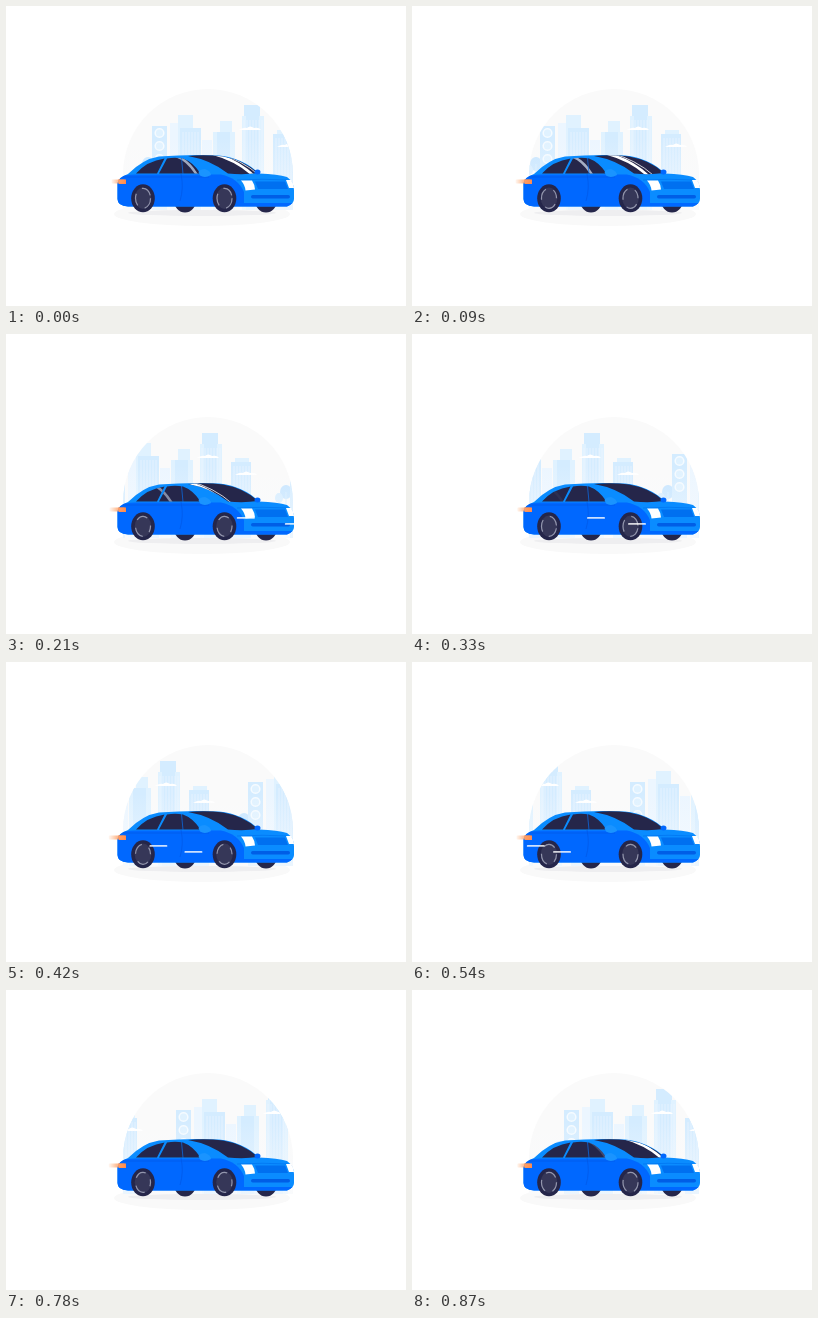
Animation, 400 px wide and 300 px high, one loop 0.9 s. Source, as an HTML page:

```html
<!DOCTYPE html>
<html lang="en">
<head>
<meta charset="utf-8">
<title>City drive</title>
<style>
  html, body { margin: 0; width: 100%; height: 100%; overflow: hidden; background: #fff; }
  svg { display: block; width: 400px; height: 300px; }
</style>
</head>
<body>
<svg viewBox="0 0 400 300">
  <defs>
    <clipPath id="dome"><path id="sky" d="M117 204V168.500a85 85.500 0 0 1 170 0V204Z"/></clipPath>
    <clipPath id="screen"><path d="M182 150Q200 148.500 217 150.500Q238 154 252 167Q238 169 222 167.500Q205 154 182 150Z"/></clipPath>
    <clipPath id="side"><path d="M130 167.500Q141 155 158.500 152.500L151 167.500ZM153 167.500L161 152.500Q169 151 177 152.500Q187 156 194.500 167.500Z"/></clipPath>
    <clipPath id="body"><path id="shell" d="M111.500 177Q113 171 122 168Q137 153 153 150.500Q184 148 213 149.500Q237 152 253 167.500Q272 168 281 171Q288 176 288 184V193Q288 198 281 200.500H122Q111.500 200 111.500 193Z"/></clipPath>
    <linearGradient id="flame">
      <stop stop-color="#ffb27d" stop-opacity=".1"/><stop offset=".5" stop-color="#ffa56d" stop-opacity=".75"/><stop offset="1" stop-color="#ff9050"/>
    </linearGradient>
    <linearGradient id="mist" x2="0" y2="1">
      <stop offset=".3" stop-color="#f9fbfd" stop-opacity="0"/><stop offset="1" stop-color="#f9fbfd" stop-opacity=".65"/>
    </linearGradient>
    <g id="city"></g>
    <g id="wheel">
      <ellipse rx="11.800" ry="14" fill="#25264a"/>
      <ellipse rx="8.300" ry="10.700" fill="#363758"/>
    </g>
  </defs>

  <use href="#sky" fill="#fafafa"/>
  <ellipse cx="196" cy="208" rx="88" ry="12" fill="#f9f9f9"/>
  <g clip-path="url(#dome)">
    <g id="track">
      <use href="#city" x="-180"/><use href="#city"/><use href="#city" x="180"/>
    </g>
    <rect x="108" y="99" width="182" height="108" fill="url(#mist)"/>
  </g>
  <ellipse cx="196" cy="207" rx="74" ry="3" fill="#eeeef0"/>

  <g fill="#25264a">
    <ellipse cx="179" cy="194.500" rx="11" ry="12"/>
    <ellipse cx="260" cy="194.500" rx="11" ry="12"/>
  </g>
  <use href="#shell" fill="#0a8cff"/>
  <g clip-path="url(#body)">
    <path d="M110 172Q118 168.500 130 168.500H215Q232 172 238 186V203H110Z" fill="#0068ff"/>
    <path d="M238 197H290V203H238Z" fill="#0068ff"/>
    <path d="M116 171H203M175 168Q178 182 174 195" fill="none" stroke="#0058e6" stroke-width=".7"/>
    <path d="M231 174Q258 172.500 281 174" fill="none" stroke="#0076f2" stroke-width=".8"/>
    <path d="M249 175.500H279L282 183H252Z" fill="#0070f0"/>
    <rect x="245" y="189" width="39" height="3.500" rx="1.700" fill="#005ee6"/>
  </g>

  <g clip-path="url(#side)">
    <path d="M125 148H200V170H125Z" fill="#25264a"/>
    <path id="sideGlint" d="M170 150Q182 154 191 169" fill="none" stroke="#dce9f8" stroke-width="2.500" opacity=".7"/>
  </g>
  <path d="M175.500 152L177 168" stroke="#0a70f0" stroke-width=".7"/>
  <g clip-path="url(#screen)">
    <path d="M180 146H257V171H180Z" fill="#25264a"/>
    <g id="glint" fill="none" stroke="#fff">
      <path d="M204 147Q230 153 248 170" stroke-width="2.600"/>
      <path d="M210 147Q235 153 254 170" stroke-width=".8"/>
    </g>
  </g>
  <path d="M192.500 166Q194 163 199 163Q205 165 205 169Q199 172.500 194 169.500Z" fill="#1a94ff"/>
  <ellipse cx="251.500" cy="166" rx="3" ry="2.500" fill="#0068ff"/>

  <path d="M235 174.500H246Q249 179 249 183.500L239.500 184.500Q239 179 235 174.500ZM280 174H285Q288 178 288 182H283Z" fill="#fff"/>
  <path d="M112 173.500H120V178H113Z" fill="#ff8a4f"/>
  <rect id="trail" y="173.500" height="4" rx="1" fill="url(#flame)"/>

  <use href="#wheel" x="137" y="192.300"/>
  <use href="#wheel" x="218.500" y="192.300"/>
  <g id="rims" fill="none" stroke="#9396ad" stroke-width="1.200" stroke-dasharray="12 8">
    <ellipse cx="137" cy="192.300" rx="7.500" ry="10"/>
    <ellipse cx="218.500" cy="192.300" rx="7.500" ry="10"/>
  </g>
  <g clip-path="url(#body)" fill="#fff" fill-opacity=".8">
    <rect id="upper" y="183" width="18" height="1.800" rx=".9"/>
    <rect id="lower" y="189" width="18" height="1.800" rx=".9"/>
  </g>
</svg>
<script>
const LOOP = 900, STEP = 30, SPAN = 180;
const $ = id => document.getElementById(id);
const set = (id, name, value) => $(id).setAttribute(name, value);

const pale = '#ecf6ff', light = '#e0f2ff', deep = '#d4ecff';
const block = (x, top, width, fill) =>
  `<rect x="${x}" y="${top}" width="${width}" height="${205 - top}" fill="${fill}"/>`;
const stripes = (x, top, count) => Array.from({ length: count }, (_, i) =>
  `<path d="M${x + i * 3} ${top}V190" stroke="${pale}" stroke-width=".7"/>`).join('');
const cloud = (x, y) =>
  `<path d="M${x - 11} ${y + 2}Q${x - 6} ${y - 1} ${x - 3} ${y}Q${x} ${y - 3} ${x + 4} ${y}Q${x + 9} ${y - 1} ${x + 11} ${y + 2}Z" fill="#fff"/>`;

$('city').innerHTML =
  block(146, 120, 15, deep) +
  [127, 140, 153].map(y => `<circle cx="153.500" cy="${y}" r="4.300" fill="${light}" stroke="#f5fbff" stroke-width="1.500"/>`).join('') +
  block(164, 117, 10, pale) + block(172, 109, 15, light) + block(174, 122, 21, deep) + stripes(177, 126, 6) +
  block(196, 134, 10, pale) + block(214, 115, 12, light) + block(207, 126, 22, light) + block(211, 126, 13, deep) +
  block(238, 99, 16, deep) + block(236, 110, 22, light) + block(240, 110, 13, deep) + stripes(238, 114, 7) +
  block(271, 124, 14, light) + block(267, 128, 20, deep) + stripes(270, 132, 6) +
  `<ellipse cx="322" cy="158" rx="6" ry="7" fill="#c6e5ff"/><ellipse cx="315" cy="164" rx="4" ry="5" fill="${deep}"/>` +
  `<path d="M322 158V190M315 164V190" stroke="${deep}"/>` +
  cloud(244, 122) + cloud(282, 139);

// Streaks slow down as they cross the body.
function streak(id, t, x, speed, drag) {
  const d = t - 330;
  set(id, 'x', x - speed * d + drag * d * d);
  set(id, 'opacity', Math.max(0, Math.min(1, (t - 120) / 90, (780 - t) / 150)));
}

function draw(t) {
  set('track', 'transform', `translate(${-t * SPAN / LOOP})`);

  const sweep = t > 750 ? t - LOOP : t;
  set('glint', 'transform', `translate(${-sweep * .13})`);
  set('glint', 'opacity', Math.max(0, Math.min(1, (430 - sweep) / 200)));
  set('sideGlint', 'transform', `translate(${-sweep * .12})`);
  set('sideGlint', 'opacity', Math.max(0, Math.min(.7, (sweep + 40) / 60, (340 - sweep) / 250)));

  streak('upper', t, 175, .4, .00054);
  streak('lower', t, 216, .463, .000505);

  const length = 15 - 1.5 * Math.cos(t / LOOP * Math.PI * 6);
  set('trail', 'x', 119 - length);
  set('trail', 'width', length);
  set('rims', 'stroke-dashoffset', -t / LOOP * 60);
}

function frame(now) {
  draw(Math.floor(now % LOOP / STEP) * STEP);
  requestAnimationFrame(frame);
}
requestAnimationFrame(frame);
</script>
</body>
</html>
```
